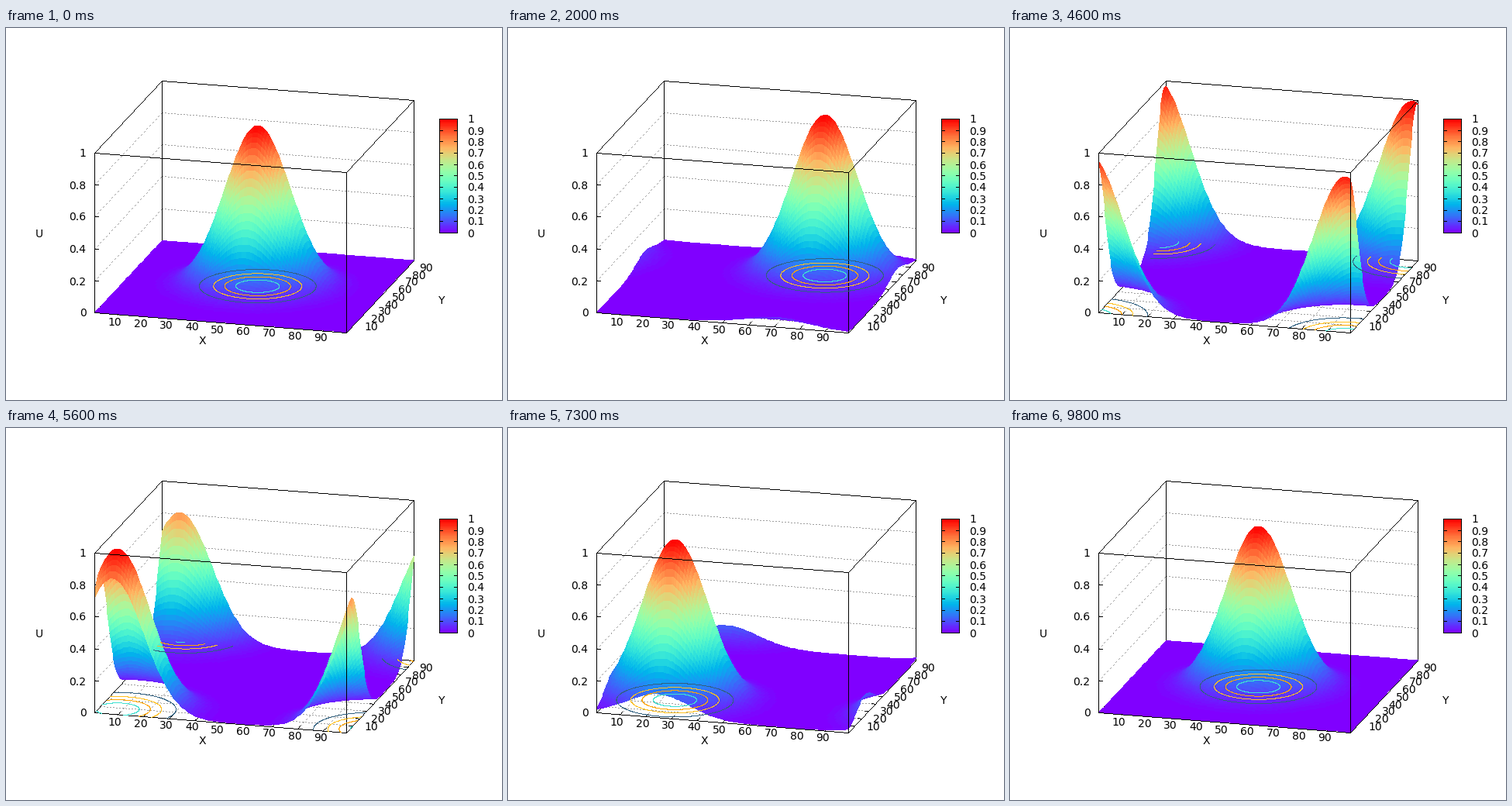
Write a matplotlib script that moves like this. It is 640 by 480 pixels and loops after 9900 ms.

```python
import numpy as np
import matplotlib.pyplot as plt
from matplotlib.animation import FuncAnimation
from matplotlib.colors import ListedColormap

W, H = 640, 480
LO, HI, PERIOD = 1, 99, 99
START = 51
SPREAD = 300
FRAMES = 99
FONT_PX = 14
GRAY = "#a0a0a0"
LEVELS = {0.2: "#306080", 0.4: "#ffc020", 0.6: "#ffa500", 0.8: "#40e0d0"}


def project(x, y, z=0.0):
    """Map data coordinates to stage pixels."""
    u = (x - LO) / (HI - LO)
    v = (y - LO) / (HI - LO)
    return 114 + 325 * u + 87.1 * v, 367.2 + 25.6 * u - 93.2 * v - 206.4 * z


def rainbow(n=128):
    t = np.linspace(0, 1, n)
    rgb = np.stack([abs(2 * t - 0.5), np.sin(np.pi * t), np.cos(np.pi * t / 2)], axis=1)
    return ListedColormap(np.clip(rgb, 0, 1))


CMAP = rainbow()

fig = plt.figure(figsize=(W / 100, H / 100), dpi=100, facecolor="white")
ax = fig.add_axes([0, 0, 1, 1])
ax.axis("off")


def pixels(x, y):
    """Snap to whole pixels; a pixel marker fills the row above its anchor."""
    return np.rint(x), np.rint(y) + 1


def dots(x, y, color, zorder):
    """Set single crisp pixels."""
    return ax.plot(*pixels(x, y), linestyle="none", marker=",",
                   color=color, zorder=zorder)[0]


def line(a, b, color="black", zorder=3, dashed=False):
    a, b = np.rint(a), np.rint(b)
    n = int(max(abs(b - a))) + 1
    x, y = np.linspace(a[0], b[0], n), np.linspace(a[1], b[1], n)
    if dashed:
        on = np.arange(n) % 4 < 2
        x, y = x[on], y[on]
    dots(x, y, color, zorder)


def label(x, y, text, ha="center"):
    ax.text(x + 0.5, np.rint(y) + 5.5, text, ha=ha, va="baseline",
            family="DejaVu Sans", fontsize=FONT_PX * 0.72, color="black", zorder=6)


def draw_grid():
    for k in range(10, 100, 10):
        line(project(k, LO), project(k, HI), GRAY, 1, True)
        line(project(LO, k), project(HI, k), GRAY, 1, True)
    for z in (0.2, 0.4, 0.6, 0.8):
        line(project(LO, LO, z), project(LO, HI, z), GRAY, 1, True)
        line(project(LO, HI, z), project(HI, HI, z), GRAY, 1, True)


def draw_box():
    corners = [(LO, LO), (HI, LO), (HI, HI), (LO, HI)]
    for i, a in enumerate(corners):
        b = corners[(i + 1) % 4]
        front = 3 if i < 2 else 1
        line(project(*a), project(*b), zorder=front)
        line(project(*a, 1), project(*b, 1), zorder=3)
        line(project(*a), project(*a, 1), zorder=front)


def draw_axes():
    for k in range(10, 100, 10):
        x, y = project(k, LO)
        line((x, y), (x + 3.4, y - 3.6), zorder=1.5)
        label(x - 4, y + 8, str(k))
        x, y = project(HI, k)
        line((x, y), (x - 5, y - 0.4), zorder=1.5)
        label(x + 23.3, y + 0.2, str(k))
    for k in range(6):
        x, y = project(LO, LO, k / 5)
        line((x, y), (x + 5, y), zorder=1.5)
        label(103, y, f"{k / 5:g}", "right")
    label(253, 402, "X")
    label(562, 351, "Y")
    label(42, 264, "U")


def draw_colorbar():
    left, right, top, bottom = 559, 582, 117, 264
    ax.imshow(np.linspace(1, 0, bottom - top + 1)[:, None], cmap=CMAP, aspect="auto",
              extent=(left, right + 1, bottom + 1, top), interpolation="nearest",
              zorder=2)
    for x in (left, right):
        line((x, top), (x, bottom))
    for y in (top, bottom):
        line((left, y), (right, y))
    for k in range(11):
        y = bottom - (bottom - top) * k / 10
        line((left, y), (left + 4, y))
        line((right - 4, y), (right, y))
        label(595, y, f"{k / 10:g}", "left")


draw_grid()
draw_box()
draw_axes()
draw_colorbar()
ax.set_xlim(0, W)
ax.set_ylim(H, 0)
ax.set_autoscale_on(False)

# Rows run from back to front so nearer cells cover farther ones.
GX, GY = np.meshgrid(np.arange(LO, HI + 1), np.arange(HI, LO - 1, -1))
ANGLE = np.linspace(0, 2 * np.pi, 500)
rings = {level: dots([], [], color, 5) for level, color in LEVELS.items()}
surface = None


def wrapped(d):
    return (d + PERIOD / 2) % PERIOD - PERIOD / 2


def ring_points(level, center):
    r = np.sqrt(-SPREAD * np.log(level))
    shifts = (-PERIOD, 0, PERIOD)
    x = np.concatenate([center + i + r * np.cos(ANGLE) for i in shifts for _ in shifts])
    y = np.concatenate([center + j + r * np.sin(ANGLE) for _ in shifts for j in shifts])
    inside = (x >= LO) & (x <= HI) & (y >= LO) & (y <= HI)
    return pixels(*project(x[inside], y[inside]))


def update(frame):
    global surface
    center = (START + frame - LO) % PERIOD + LO
    z = np.exp(-(wrapped(GX - center) ** 2 + wrapped(GY - center) ** 2) / SPREAD)
    px, py = project(GX, GY, z)
    cell = (z[1:, 1:] + z[:-1, 1:] + z[1:, :-1] + z[:-1, :-1]) / 4
    if surface is not None:
        surface.remove()
    surface = ax.pcolormesh(px + 0.5, py, cell, cmap=CMAP, vmin=0, vmax=1,
                            shading="flat", antialiased=False, zorder=2)
    for level, ring in rings.items():
        ring.set_data(*ring_points(level, center))
    return [surface, *rings.values()]


anim = FuncAnimation(fig, update, frames=FRAMES, interval=100, repeat=True,
                     repeat_delay=0, blit=False)
plt.show()
```
